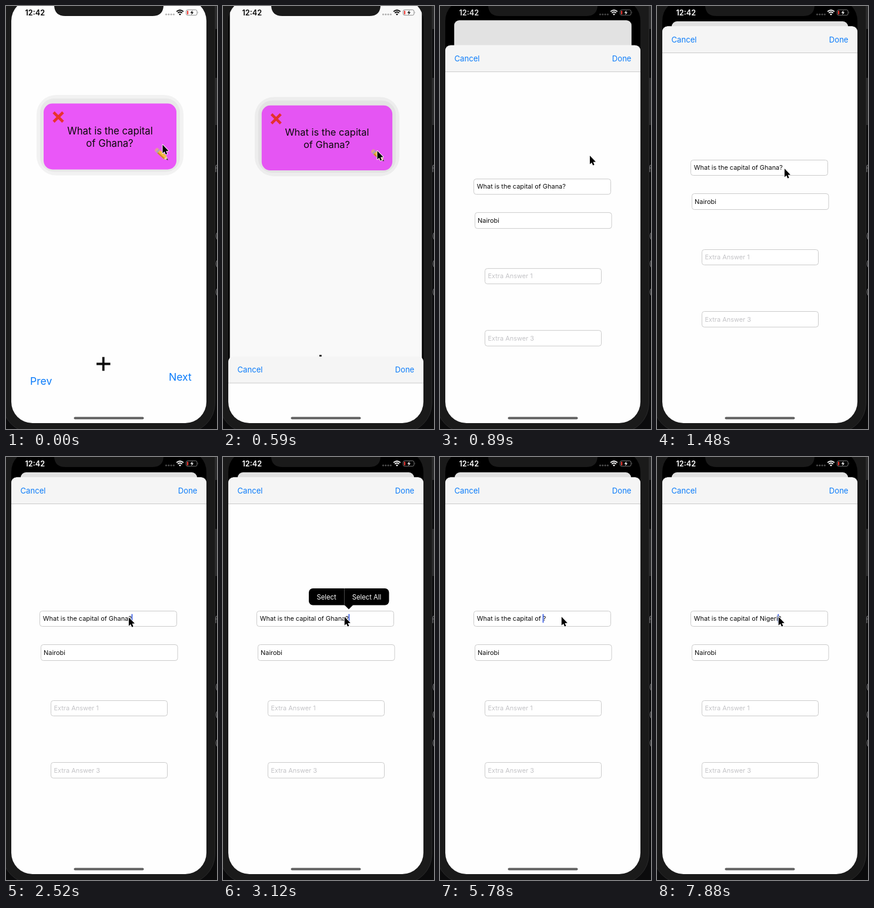
An HTML page for the animation above (8 s loop, 359 px wide and 718 px high).

```html
<!DOCTYPE html>
<html lang="en">
<head>
<meta charset="utf-8">
<title>Flashcard editor</title>
<style>
  html, body { margin: 0; width: 100%; height: 100%; overflow: hidden; background: #0b0b0c; }
  svg { display: block; width: 359px; height: 718px; font-family: Inter, "Liberation Sans", sans-serif; }
  text { white-space: pre; }
  .link { fill: #0a7bfa; }
  .bar { font-size: 13.1px; }
  .nav { font-size: 17.6px; }
  .question { font-size: 16.7px; text-anchor: middle; fill: #0a0a0a; }
  .field rect { fill: #fff; stroke: #cbcbcb; }
  .field text { font-size: 10.95px; fill: #0a0a0a; }
  .field .hint { fill: #c3c3c6; }
  .menu text { font-size: 11.25px; fill: #fff; }
  .clock { font-size: 12.7px; font-weight: 600; }
  .side { fill: none; stroke: #77777a; stroke-width: 1.2; }
</style>
</head>
<body>
<svg viewBox="0 0 359 718">
  <defs>
    <clipPath id="screen"><rect x="9" y="-11" width="332" height="719" rx="36"/></clipPath>
  </defs>

  <!-- desktop edge and phone body -->
  <rect width="359" height="718" fill="#0b0b0c"/>
  <rect x="356" width="3" height="39" fill="#2a2a2b"/>
  <rect x="356" y="122" width="3" height="80" fill="#2a2a2b"/>
  <path class="side" d="M359 270q-2 0-2 3v9m-1-7h3M359 385q-3 5 0 11M359 432q-3 5 0 11M359 480q-3 5 0 11"/>
  <rect x="-6" y="-60" width="361.5" height="784" rx="50" fill="#1a1a1a" stroke="#29292a"/>

  <g clip-path="url(#screen)">
    <rect x="9" y="-11" width="332" height="719"/>

    <g id="back">
      <rect id="page" x="9" y="-11" width="332" height="719" fill="#fefefe"/>
      <rect x="52" y="151" width="250" height="136.5" rx="33" fill="#f2f2f2"/>
      <rect x="58" y="157" width="238" height="124.5" rx="24" fill="#e8e8e8"/>
      <rect x="64" y="165.5" width="226" height="112" rx="15" fill="#ea57f8"/>
      <path d="M81 180.5L97 196.500M97 180.500L81 196.500" stroke="#e9322f" stroke-width="4.600"/>
      <text class="question" x="177" y="217.500">What is the capital</text>
      <text class="question" x="176.500" y="239">of Ghana?</text>
      <g transform="translate(265 252) rotate(42)">
        <path d="M-10-3.500h-2q-2 0-2 2v3q0 2 2 2h2z" fill="#e59a98"/>
        <path d="M-10-3.500h3v7h-3z" fill="#a9a9ad"/>
        <path d="M-7-3.500H8v7H-7z" fill="#f5bd3f"/>
        <path d="M-7 1.200H8v2.300H-7z" fill="#cf8a2a"/>
        <path d="M8-3.500L14 0L8 3.500z" fill="#ecd0a3"/>
        <path d="M11.500-1.500L14.500 0L11.500 1.500z" fill="#333"/>
      </g>
      <path d="M154 607.500h23.500M165.700 595.700v23.500" stroke="#0c0c0c" stroke-width="3.800"/>
      <text class="link nav" x="41" y="642.500">Prev</text>
      <text class="link nav" x="277" y="636">Next</text>
      <rect id="dim" x="9" y="-11" width="332" height="719"/>
    </g>

    <g id="sheet">
      <rect x="9" y="34.500" width="332" height="720" rx="9" fill="#fefefe"/>
      <path d="M9 79.500V43.500a9 9 0 0 1 9-9H332a9 9 0 0 1 9 9V79.500z" fill="#f5f5f5"/>
      <path d="M9 79.500H341" stroke="#cacaca"/>
      <text class="link bar" x="24.500" y="61.600">Cancel</text>
      <text class="link bar" x="325.500" y="61.600" text-anchor="end">Done</text>
      <g class="field">
        <rect x="57.500" y="261.500" width="233" height="26" rx="4"/>
        <text id="entry" x="62.800" y="278"></text>
        <rect x="59.500" y="318.500" width="232.500" height="27" rx="4"/>
        <text x="64" y="335.800">Nairobi</text>
        <rect x="76.500" y="413.500" width="198" height="26" rx="4"/>
        <text class="hint" x="81.500" y="430.300">Extra Answer 1</text>
        <rect x="76.500" y="518.500" width="198" height="26.500" rx="4"/>
        <text class="hint" x="81.500" y="536">Extra Answer 3</text>
      </g>
      <rect id="caret" y="266.500" width="1.800" height="15" rx=".8" fill="#4265e6"/>
      <g id="menu" class="menu">
        <rect x="146" y="223" width="136.500" height="28.500" rx="7"/>
        <path d="M206.500 251h15l-7.500 7.500z"/>
        <path d="M206.500 223v28.500" stroke="#4a4a4a"/>
        <text x="159.500" y="242">Select</text>
        <text x="219.700" y="242">Select All</text>
      </g>
    </g>

    <!-- status bar -->
    <g id="status">
      <text class="clock" x="32.500" y="15.600">12:42</text>
      <g opacity=".3">
        <circle cx="272.500" cy="14.200" r="1.500"/><circle cx="276.800" cy="14.200" r="1.500"/>
        <circle cx="281.100" cy="14.200" r="1.500"/><circle cx="285.400" cy="14.200" r="1.500"/>
      </g>
      <path d="M296 16l-2-2.200q2-1.600 4 0z"/>
      <path d="M292.300 11.900q3.700-3.200 7.400 0M290.200 9.400q5.800-4.800 11.600 0" fill="none" stroke="currentColor" stroke-width="1.900"/>
      <rect x="306.500" y="6.500" width="18.500" height="9.200" rx="2.600" fill="none" stroke="currentColor" opacity=".45"/>
      <path d="M326.200 9.500q1.500 1.500 0 3.200z" opacity=".45"/>
      <rect x="308" y="8" width="2.200" height="6.200" rx=".8" fill="#ee3a35"/>
      <path d="M317.500 7.200l-4 4.600h2.700l-1 3.400 4-4.700h-2.700z"/>
    </g>
    <path d="M80-12L82 0Q83 17 101 17H249Q267 17 268 0L270-12z" fill="#1a1a1a"/>
    <rect x="115.500" y="697.400" width="119" height="4" rx="2" fill="#606060"/>
  </g>

  <path id="cursor" d="M0 0V14.500L3.200 11.600L5.300 16.500L7.700 15.500L5.600 10.700L10 10.400Z"
        fill="#000" stroke="#fff" stroke-width="1.800" paint-order="stroke" stroke-linejoin="round"/>
</svg>

<script>
const LOOP = 8000;
const STEP = 148.4;
const $ = id => document.getElementById(id);
const [back, page, dim, sheet, entry, caret, menu, status_, cursor] =
  ["back", "page", "dim", "sheet", "entry", "caret", "menu", "status", "cursor"].map($);

// [time, x, y]
const cursorPath = [
  [0, 266.5, 235.5], [450, 264, 243], [742, 261, 249], [890, 255, 254], [1039, 237, 267],
  [1187, 219, 277], [1335, 218.5, 277.5], [1484, 217, 276],
  [1930, 217, 276], [2375, 211, 273], [2671, 206.8, 271.3]
];
const menuFade = [[2820, 0], [2968, .5], [3116, 1], [3570, 1], [3710, .6], [3858, .2], [4006, 0]];
const words = [
  [0, "Ghana"], [4900, "Ghan"], [5340, "Gha"], [5490, "Gh"], [5640, "G"], [5780, ""],
  [6380, "N"], [6830, "Ni"], [7280, "Nig"], [7580, "Nige"], [7730, "Niger"], [7880, "Nigeri"]
];
const caretOff = [[0, 1780], [2220, 2520], [3420, 3720], [4300, 4450]];

function track(keys, t) {
  const i = keys.findIndex(k => k[0] > t);
  if (i === 0) return keys[0].slice(1);
  if (i < 0) return keys[keys.length - 1].slice(1);
  const a = keys[i - 1], b = keys[i], f = (t - a[0]) / (b[0] - a[0]);
  return a.slice(1).map((v, n) => v + (b[n + 1] - v) * f);
}

// critically damped spring that lifts the sheet
function rise(t) {
  if (t < 540) return 0;
  if (t >= 1180) return 1;
  const x = (t - 540) * .0137;
  return 1 - (1 + x) * Math.exp(-x);
}

function drawSheet(p) {
  sheet.setAttribute("transform", `translate(0 ${673.5 * (1 - p)})`);
  sheet.setAttribute("visibility", p ? "visible" : "hidden");
  back.setAttribute("transform", `translate(175 ${-11 + 37 * p}) scale(${1 - .096 * p}) translate(-175 11)`);
  page.setAttribute("rx", 10 * p);
  dim.setAttribute("rx", 10 * p);
  dim.setAttribute("opacity", .115 * p);
  const v = Math.round(255 * p * p);
  status_.style.color = status_.style.fill = `rgb(${v},${v},${v})`;
}

function drawEntry(t) {
  const word = words.filter(w => w[0] <= t).pop()[1];
  const text = `What is the capital of ${word}?`;
  if (entry.textContent !== text) entry.textContent = text;
  const end = text.length - (t < 3720 ? 0 : 1);
  caret.setAttribute("x", 62.5 + entry.getSubStringLength(0, end));
  caret.setAttribute("opacity", caretOff.some(([a, b]) => t >= a && t < b) ? 0 : 1);
}

function draw(t) {
  const tick = Math.floor((t + 8) / STEP) * STEP;
  drawSheet(rise(tick));
  drawEntry(t);
  menu.setAttribute("opacity", track(menuFade, tick)[0]);
  cursor.setAttribute("transform", `translate(${track(cursorPath, tick)})`);
}

const start = performance.now();
function loop() {
  draw((performance.now() - start) % LOOP);
  requestAnimationFrame(loop);
}
loop();
</script>
</body>
</html>
```
